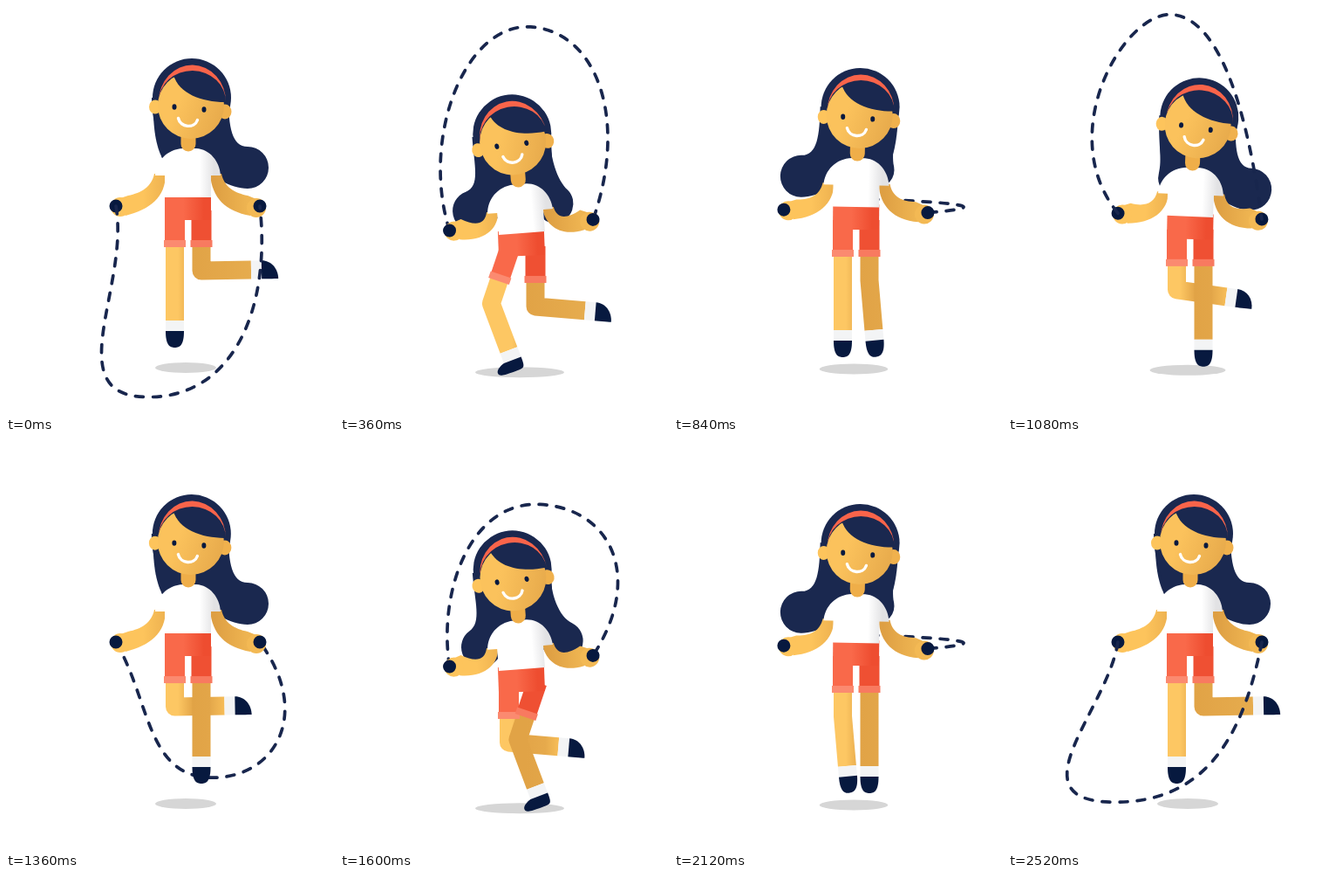
Animation of 376 by 467 pixels, one loop 2.56 s. Source, as an HTML page:

```html
<!DOCTYPE html>
<html lang="en">
<head>
<meta charset="utf-8">
<title>Skipping rope</title>
<style>
html, body { margin: 0; width: 100%; height: 100%; overflow: hidden; background: #fff; }
svg { display: block; width: 100vw; height: 100vh; }
.rope { fill: none; stroke: #18264d; stroke-width: 3.7; stroke-linecap: round; stroke-dasharray: 9 11; }
.hair { fill: #1a284f; }
.leg { fill: none; stroke-width: 21; stroke-linejoin: round; }
.skin { fill: #fdc45c; }
.ink { fill: #07193f; }
</style>
</head>
<body>
<svg viewBox="0 0 376 467">
  <defs>
    <linearGradient id="face" x1="0" y1=".2" x2="1" y2=".6">
      <stop offset=".35" stop-color="#fbc25c"/><stop offset="1" stop-color="#e8ab4c"/>
    </linearGradient>
    <linearGradient id="shirt">
      <stop offset=".68" stop-color="#fff"/><stop offset=".9" stop-color="#e2e2e4"/>
    </linearGradient>
    <linearGradient id="skinL">
      <stop offset=".5" stop-color="#fdc45c"/><stop offset="1" stop-color="#eeb250"/>
    </linearGradient>
    <linearGradient id="skinR">
      <stop offset=".1" stop-color="#de9f43"/><stop offset=".8" stop-color="#eeb451"/>
    </linearGradient>
    <linearGradient id="legL" gradientUnits="userSpaceOnUse" x1="183" x2="253">
      <stop offset=".2" stop-color="#fdc763"/><stop offset=".45" stop-color="#e3a548"/>
      <stop offset=".75" stop-color="#e6aa4c"/><stop offset="1" stop-color="#f9c05a"/>
    </linearGradient>
    <linearGradient id="legR" gradientUnits="userSpaceOnUse" x1="214" x2="282">
      <stop offset="0" stop-color="#e1a346"/><stop offset="1" stop-color="#e6ac4e"/>
    </linearGradient>
    <linearGradient id="pants" gradientUnits="userSpaceOnUse" x1="182" x2="235">
      <stop offset=".4" stop-color="#f9694a"/><stop offset=".85" stop-color="#ee4d30"/>
    </linearGradient>
  </defs>

  <ellipse id="shadow" cx="206" ry="6" fill="#d6d6d6"/>
  <path id="ropeBack" class="rope"/>
  <g id="hairBox">
    <path id="hairBase" class="hair"/>
    <path id="tailR" class="hair"/>
    <path id="tailL" class="hair" transform="translate(422 0) scale(-1 1)"/>
  </g>

  <path id="limbL" class="leg" stroke="url(#legL)"/>
  <g id="footL"><rect x="-10.5" width="21" height="12.5" fill="#f3f4f5"/><path id="shoeL" class="ink"/></g>
  <path id="limbR" class="leg" stroke="url(#legR)"/>
  <g id="footR"><rect x="-10.5" width="21" height="12.5" fill="#f3f4f5"/><path id="shoeR" class="ink"/></g>
  <g id="shortL"><rect x="-11.5" y="-6" width="23" height="35" fill="#f9694a"/><rect x="-12.5" y="28" width="25" height="8" fill="#fb8a70"/></g>
  <g id="shortR"><rect x="-11.5" y="-6" width="23" height="35" fill="#ef5033"/><rect x="-12.5" y="28" width="25" height="8" fill="#f87a60"/></g>
  <path id="seat" d="M182 216H235V245H182Z" fill="url(#pants)"/>

  <g id="torso">
    <path id="armL" fill="url(#skinL)"/>
    <path id="armR" fill="url(#skinR)"/>
    <g id="hands">
      <circle class="skin" cx="131" cy="230" r="11"/>
      <circle cx="287" cy="231" r="11" fill="#f3b954"/>
      <circle class="ink" cx="126" cy="229" r="7.5"/>
      <circle class="ink" cx="291" cy="229" r="7.5"/>
    </g>
    <path d="M182 219V194H171C172 178 184 164 203 163H218C234 164 245 178 246 194H235V219Z" fill="url(#shirt)"/>
    <rect x="200.5" y="140" width="17" height="26.5" rx="8.5" fill="#efae49"/>
    <g id="head">
      <circle class="hair" cx="213" cy="105" r="45"/>
      <ellipse class="skin" cx="171" cy="115.500" rx="7" ry="8"/>
      <ellipse cx="251" cy="121" rx="7.500" ry="8.500" fill="#f0b14d"/>
      <circle cx="212" cy="114" r="38" fill="url(#face)"/>
      <path class="hair" d="M192 79C198 100 224 110 251 110A38.5 35 0 0 0 192 79Z"/>
      <path d="M175 109A38.5 42 0 0 1 252 110A38.5 35.5 0 0 0 175 109Z" fill="#f9644a"/>
      <ellipse class="ink" cx="193" cy="115.500" rx="2.5" ry="3.2"/>
      <ellipse class="ink" cx="227" cy="118.500" rx="2.5" ry="3.2"/>
      <path d="M197.500 128.500C200 139.500 216 140.500 219.500 130.500" fill="none" stroke="#fff" stroke-width="3.4" stroke-linecap="round"/>
    </g>
  </g>
  <path id="ropeFront" class="rope"/>
</svg>

<script>
const LOOP = 2560, HOP = 640, SWING = 1280, STEP = 40, RAD = Math.PI / 180;
const { sin, cos, acos, asin, min, max, sqrt } = Math;
const el = {};
document.querySelectorAll('svg [id]').forEach(n => el[n.id] = n);
const set = (id, attrs) => { for (const k in attrs) el[id].setAttribute(k, attrs[k]); };
const clamp = v => max(0, min(1, v));
const mod = (a, n) => (a % n + n) % n;
const smooth = (a, b, t) => { const u = clamp((t - a) / (b - a)); return u * u * (3 - 2 * u); };
const wave = (t, period) => cos(2 * Math.PI * t / period);

// How far the body is down in its hop, 0 to 1
const crouch = t => ((1 + wave(t - 340, HOP)) / 2) ** 2.6;

// Hair tail on the right: a round end that swings out by k
function tail(id, t, dx) {
  const k = smooth(-.9, .6, wave(t, SWING));
  const r = 20 + 4 * k, x = 224 + 53 * k, y = 168 + 17 * k + 50 * k * (1 - k);
  const sn = sin(90 * k * RAD), cs = cos(90 * k * RAD);
  const ex = x + r * cs, ey = y - r * sn, top = 255 + dx;
  set(id, { d: `M${top} 105C${top} 138 ${ex - 18 * sn} ${ey - 18 * cs} ${ex} ${ey}` +
    `A${r} ${r} 0 0 1 ${x} ${y + r}C${x - 20} ${y + r} 235 195 222 180L215 105Z` });
}

// Thigh and shin: the standing leg gives at the knee, the other folds back
function leg(side, hx, t, dy, down) {
  const T = mod(t, LOOP), thigh = 63, shin = 57, hy = 240 + dy;
  const fold = 1 - smooth(660, 870, T) + smooth(2200, 2390, T);
  const stand = clamp(1 - 3 * fold);
  const d = 120 - .5 * max(0, dy - 27) * stand;
  const a = acos(min(1, (thigh ** 2 + d * d - shin ** 2) / (2 * thigh * d)));
  const c = asin(thigh * sin(a) / shin) + fold * (91 - 6 * down) * RAD;
  const kx = hx - thigh * sin(a), ky = hy + thigh * cos(a);
  const ax = kx + shin * sin(c), ay = ky + shin * cos(c);
  set('limb' + side, { d: `M${hx} ${hy}L${kx} ${ky}L${ax} ${ay}` });
  set('foot' + side, { transform: `translate(${ax} ${ay}) rotate(${-c / RAD})` });
  set('short' + side, { transform: `translate(${hx} ${hy}) rotate(${a / RAD})` });

  const flat = clamp((dy - 27) / 10) * stand, y = 31 - 6 * flat;
  set('shoe' + side, { d: `M-10.5 12H10.5C10.5 ${28 - 5 * fold} ${6 - 5 * fold + 4 * flat} ${y} ${-10.5 * fold - 12 * flat} ${y}` +
    `C${-6 - 4.5 * fold - 18 * flat} ${y} ${-10.5 - 14 * flat} ${28 - 10 * fold - 12 * flat} -10.5 12Z` });
}

// The rope turns about the hands, slower on its way over the head
function rope(t, from, to) {
  const lin = 360 * mod(t, HOP) / HOP;
  const turn = (lin - 26 * (1 - cos((lin - 30) * RAD))) * RAD;
  const s = sin(turn), v = cos(turn);
  const c1 = [105 + 45 * s + 40 * v, 230 + 90 * v];
  const c2 = [104 + 72 * s - 36 * v + 65 * s * v, 218 + 228 * v];
  const c3 = [265 + 60 * s, 225 + 225 * v];
  const c4 = [303 + 66 * s + 5 * v, 230 + 115 * v];
  const mid = c2.map((p, i) => (p + c3[i]) / 2);
  const front = s < .01;
  set('ropeFront', { d: `M${from}C${c1} ${c2} ${mid}C${c3} ${c4} ${to}`, visibility: front ? 'visible' : 'hidden' });
  set('ropeBack', { d: el.ropeFront.getAttribute('d'), visibility: front ? 'hidden' : 'visible' });
}

function draw(t) {
  const down = crouch(t), dy = 42 * down;
  const side = mod(t, SWING) < HOP ? 1 : -1;
  const lean = -4.5 * side * down;
  const nod = 2 * wave(t, SWING) - 5 * side * down - 2;
  const lift = -.47 * dy, dx = 55 * sin(nod * RAD);

  set('shadow', { cy: 414 + .13 * dy, rx: 35 + .39 * dy });
  const body = `translate(0 ${dy}) rotate(${lean} 208 219)`;
  set('torso', { transform: body });
  set('hairBox', { transform: body });
  set('seat', { transform: `translate(0 ${dy}) rotate(${lean * .5} 208 245)` });
  set('head', { transform: `rotate(${nod} 209 160)` });
  set('hands', { transform: `translate(0 ${lift})` });

  set('hairBase', { d: `M${169 + dx} 105C${168 + dx} 140 172 160 179 174L238 182C252 165 ${256 + dx} 140 ${257 + dx} 105Z` });
  tail('tailR', t, dx);
  tail('tailL', t + HOP, -dx);

  const low = lift * .4;
  set('armL', { d: `M170 192C167 207 155 ${214 + low} 140 ${217 + lift}L131 ${220 + lift}L137 ${240 + lift}C165 ${233 + low} 183 ${219 + low} 183 192Z` });
  set('armR', { d: `M234 192H247C250 207 262 ${214 + low} 277 ${217 + lift}L287 ${221 + lift}L280 ${240 + lift}C252 ${235 + low} 236 ${220 + low} 234 192Z` });

  leg('L', 193.5, t + SWING, dy, down);
  leg('R', 224, t, dy, down);

  const sn = sin(lean * RAD), cs = cos(lean * RAD);
  const hand = x => {
    const u = x - 208, v = 10 + lift;
    return [208 + u * cs - v * sn, 219 + dy + u * sn + v * cs];
  };
  rope(t, hand(126), hand(291));
}

function tick() {
  draw(Math.floor(mod(performance.now(), LOOP) / STEP) * STEP);
  requestAnimationFrame(tick);
}
tick();
</script>
</body>
</html>
```
